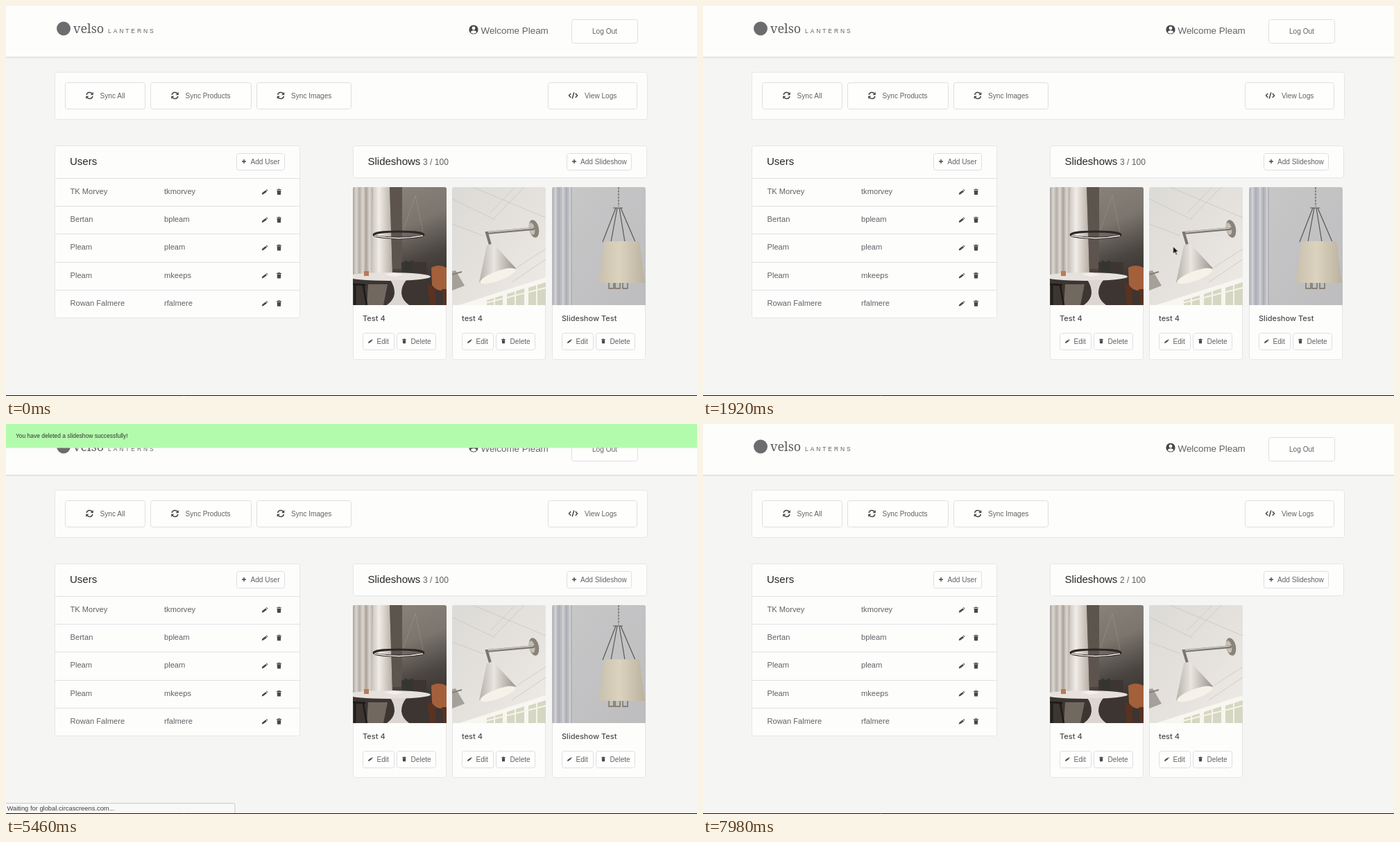
These frames come from a looping animation (996x562 px, 8000 ms). An HTML page:

```html
<!DOCTYPE html>
<html lang="en">
<head>
<meta charset="utf-8">
<title>Dashboard</title>
<style>
html, body { margin: 0; width: 100%; height: 100%; overflow: hidden; background: #f5f5f4; }
svg { display: block; width: 996px; height: 562px; font: 10.1px "Liberation Sans", Arial, sans-serif; fill: #626265; }
.panel { fill: #fdfdfc; stroke: #e6e6e9; }
.button { fill: #fefefd; stroke: #dfdfe3; }
.rule { stroke: #e0e0e5; fill: none; }
.icon { fill: #48484a; }
.row { font-size: 11.15px; }
.title { font-size: 15px; fill: #262628; }
.name { font: 500 11px Inter, sans-serif; fill: #4c4c4f; }
.cover { fill: #fdfdfc; transform-box: fill-box; transform-origin: bottom; }
.small { font-size: 9.35px; fill: #404042; }
</style>
</head>
<body>
<svg id="stage" viewBox="0 0 996 562">
  <defs>
    <filter id="shadow" x="-5%" y="-20%" width="110%" height="150%">
      <feDropShadow dx="0" dy="1" stdDeviation="1.5" flood-opacity=".13"/>
    </filter>
    <linearGradient id="wall" x2=".3" y2="1">
      <stop stop-color="#8d8780"/><stop offset=".45" stop-color="#7b756e"/><stop offset=".75" stop-color="#4b4541"/><stop offset="1" stop-color="#37312f"/>
    </linearGradient>
    <linearGradient id="curtain" x2=".3" spreadMethod="reflect">
      <stop stop-color="#a8a29b"/><stop offset=".5" stop-color="#dcd7d0"/><stop offset="1" stop-color="#b4aea7"/>
    </linearGradient>
    <linearGradient id="drape">
      <stop stop-color="#c9c3bb"/><stop offset=".35" stop-color="#f0ece6"/><stop offset="1" stop-color="#b5ada4"/>
    </linearGradient>
    <linearGradient id="ceiling" x2="1" y2="1">
      <stop stop-color="#dcdad6"/><stop offset=".6" stop-color="#e6e3df"/><stop offset="1" stop-color="#efece7"/>
    </linearGradient>
    <linearGradient id="cone">
      <stop stop-color="#b5b1aa"/><stop offset=".4" stop-color="#e9e5df"/><stop offset="1" stop-color="#98938b"/>
    </linearGradient>
    <linearGradient id="shade">
      <stop stop-color="#c8c0ad"/><stop offset=".45" stop-color="#dcd3bf"/><stop offset="1" stop-color="#bbb29f"/>
    </linearGradient>
    <linearGradient id="plaster" x2="1" y2="1">
      <stop stop-color="#c8c8c9"/><stop offset="1" stop-color="#bdbdbf"/>
    </linearGradient>
    <clipPath id="frame"><path d="M0 170V3q0-3 3-3h129q3 0 3 3v167z"/></clipPath>

    <g id="loft">
      <path fill="url(#wall)" d="M0 0h135v170H0z"/>
      <path fill="url(#curtain)" d="M0 0h32v126H0z"/>
      <path fill="url(#drape)" d="M29 0h24l4 126H27z"/>
      <path fill="#5c544d" d="M53 0h18v118H57z"/>
      <path fill="#3c3531" d="M0 130h135v40H0zM70 108h36v30H70z"/>
      <path fill="#716860" d="M22 140h28l-6 30H20z"/>
      <path fill="#35352f" d="M73 114l2-9 5 3 7-3-2 10 4 12H75z"/>
      <path fill="#a4603b" d="M113 116q10-6 22 0v32q-14 4-21-7z"/>
      <path fill="#583222" d="M107 138l12 8v24h-8zM128 147h7v23h-4z"/>
      <path stroke="#aaa69e" stroke-width=".6" d="M90 12L72 64M90 12l11 52" opacity=".6"/>
      <ellipse cx="66" cy="68.5" rx="36" ry="4.5" fill="none" stroke="#2b2726" stroke-width="3"/>
      <path d="M31 70q35 7 70 0" fill="none" stroke="#f6f1e6" stroke-width="1.5"/>
      <ellipse cx="52" cy="129" rx="60" ry="6" fill="#e6e1dd"/>
      <path fill="#dcd6d2" d="M54 134h23q-7 8-7 19 1 10 11 17H49q10-7 11-17 0-11-6-19z"/>
      <path fill="#b97b55" d="M16 121h7v7h-7z"/>
      <path fill="#f4efe9" d="M46 126l13-3 14 3-13 3z"/>
      <path fill="none" stroke="#1b1919" stroke-width="2.5" d="M0 140l18 1M3 141v29M15 142l5 28"/>
    </g>
    <g id="sconce">
      <path fill="url(#ceiling)" d="M0 0h135v170H0z"/>
      <path fill="none" stroke="#c9c6c1" stroke-width=".8" d="M0 17l62 30M0 53l45 17M30 0l105 44M91 0L55 37M104 0L60 45M135 89l-42 27M135 104l-49 33"/>
      <path fill="#f8f6f0" d="M10 170l125-40v40z"/>
      <path fill="#d5d7c2" d="M50 163l23-7v14H50zM79 154l25-8v24H79zM110 145l25-8v33h-25z"/>
      <path stroke="#f6f4e9" stroke-width="2" d="M61 158v12M91 149v21M122 141v29M48 167l87-22"/>
      <ellipse cx="118" cy="60" rx="7" ry="13" transform="rotate(-12 118 60)" fill="#89837a"/>
      <ellipse cx="115" cy="60" rx="4" ry="9" transform="rotate(-12 115 60)" fill="#c5bfb6"/>
      <path fill="none" stroke="#7b756d" stroke-width="4" stroke-linecap="round" d="M117 60l-67 6 5 17"/>
      <path fill="none" stroke="#d0cac1" stroke-width="1.4" d="M117 59l-65 6"/>
      <path fill="url(#cone)" d="M50 84l9-3 33 36q-12 19-53 20z"/>
      <ellipse cx="66" cy="128" rx="27" ry="7" transform="rotate(-20 66 128)" fill="#f6f2e9"/>
      <path fill="#a5a099" d="M0 121l5-1 13 22-18 7z"/>
      <path stroke="#85807a" stroke-width="2" d="M0 126l14-4"/>
    </g>
    <g id="pendant">
      <path fill="url(#plaster)" d="M0 0h135v170H0z"/>
      <path fill="#b9babf" d="M0 0h28v170H0z"/>
      <path stroke="#cfd0d4" stroke-width="3" d="M5 0v170M16 0v170M26 0v170"/>
      <path stroke="#a2a3a8" d="M10 0v170M21 0v170M28 0v170"/>
      <path stroke="#66625d" stroke-width="1.3" stroke-dasharray="3 1.5" d="M96 0v28"/>
      <path fill="none" stroke="#5a5650" stroke-width="1.2" d="M88 30h14M92 30L73 79M94 30l-9 49M97 30l8 49M99 30l21 49"/>
      <path fill="none" stroke="#786f5d" stroke-width="1.4" d="M82 136v10h7v-10M91 136v10h7v-10M102 136v10h7v-10"/>
      <path fill="url(#shade)" d="M76 78h50l8 60H67z"/>
    </g>

    <path id="pencil" class="icon" d="M-4 4l.6-2.6 5.2-4 2 2L-1.4 3.4zM2.5-3.3l.8-.8 2 2-.8.8z"/>
    <path id="trash" class="icon" d="M-3.6-4h2l.5-.8h2.2l.5.8h2v1.2h-7.2zM-3-2.2h6l-.4 6.4h-5.2z"/>
    <path id="plus" class="icon" d="M-.7-3h1.4v2.3H3V.7H.7V3H-.7V.7H-3V-.7h2.3z"/>
    <g id="sync">
      <path d="M-4.4-1a4.5 4.5 0 0 1 8-1.8M4.4 1a4.5 4.5 0 0 1-8 1.8" fill="none" stroke="#48484a" stroke-width="1.5"/>
      <path class="icon" d="M5.3-5v4.2H1.1zM-5.3 5V.8h4.2z"/>
    </g>
    <path id="code" d="M-3.3-3L-6 0l2.7 3M3.3-3L6 0 3.3 3M1.3-4.5l-2.6 9" fill="none" stroke="#48484a" stroke-width="1.5"/>
  </defs>

  <g id="page"></g>
  <g id="status">
    <path d="M-1 563v-16.5h328q3 0 3 3V563z" fill="#f8f8f7" stroke="#c9c9cd"/>
    <text id="link" class="small" x="1.5" y="557">global.circascreens.com/admin/dashboard</text>
    <text id="waiting" class="small" x="1.5" y="557">Waiting for global.circascreens.com...</text>
  </g>
  <path d="M0 561.5h996" stroke="#111"/>
  <g id="banner">
    <path d="M0 0h996v34.5H0z" fill="#b3fbac"/>
    <text x="14" y="20" style="font-size:8.45px;fill:#333">You have deleted a slideshow successfully!</text>
  </g>
  <g id="cursor" stroke-linejoin="round">
    <path id="resize" d="M-6 0l3.5-3.4V-1h5v-2.4L6 0 2.5 3.4V1h-5v2.4z" fill="#111" stroke="#fff" stroke-width=".7"/>
    <path id="arrow" d="M-3-6V5l2.6-2.4 1.8 4 1.8-.8-1.8-3.9H5z" fill="#111" stroke="#fff" stroke-width=".8"/>
    <path id="hand" d="M-2.4.6v-5.4c0-1.5 2-1.5 2 0v3.4l3.6.8c1.1.3 1.5 1 1.4 2.1L4 5.6h-5L-4.6 1.3c-.8-1.1.6-2 1.3-1.3z" fill="#fff" stroke="#222" stroke-width="1.1"/>
  </g>
</svg>
<script>
const LOOP = 8000, RELOAD = 6000;
const $ = id => document.getElementById(id);

const text = (x, y, label, cls = '') => `<text x="${x}" y="${y}" class="${cls}">${label}</text>`;
const box = (x, y, w, h, cls) => `<rect x="${x + .5}" y="${y + .5}" width="${w - 1}" height="${h - 1}" rx="3" class="${cls}"/>`;
const icon = (name, x, y, scale = 1) => `<use href="#${name}" transform="translate(${x} ${y}) scale(${scale})"/>`;
const button = (x, y, w, h, name, iconX, label, labelX, scale) =>
  box(x, y, w, h, 'button') + (name ? icon(name, iconX, y + h / 2 - .5, scale) : '') + text(labelX, y + h / 2 + 3, label);

const header = `
  <path d="M-5-5h1006v78H-5z" fill="#fdfdfc" filter="url(#shadow)"/>
  <circle cx="83" cy="32.5" r="10" fill="#6c6b6e"/>
  <text x="97" y="39" style="font:400 18px 'Noto Serif',serif;fill:#5c5b5e">velso</text>
  <text x="147" y="39" style="font-size:8.5px;letter-spacing:2.9px">LANTERNS</text>
  <circle cx="674" cy="34" r="6.6" class="icon"/>
  <circle cx="674" cy="32" r="2.4" fill="#fff"/><path d="M669.8 38q.6-2.8 4.2-2.8t4.2 2.8q-4.2 3.4-8.4 0z" fill="#fff"/>
  <text x="684.5" y="39.5" style="font-size:13.4px">Welcome Pleam</text>` +
  button(815, 19, 96, 35, '', 0, 'Log Out', 845);

const tools = box(70, 95, 855, 69, 'panel') +
  button(85, 110, 116, 39, 'sync', 120.5, 'Sync All', 135.5) +
  button(208, 110, 146, 39, 'sync', 243.5, 'Sync Products', 258.5) +
  button(361, 110, 137, 39, 'sync', 396, 'Sync Images', 411) +
  button(781, 110, 129, 39, 'code', 817.5, 'View Logs', 834);

const people = [['TK Morvey', 'tkmorvey'], ['Bertan', 'bpleam'], ['Pleam', 'pleam'],
  ['Pleam', 'mkeeps'], ['Rowan Falmere', 'rfalmere']];
const users = box(70, 201, 354, 249, 'panel') + text(92, 228.5, 'Users', 'title') +
  button(332, 212, 70, 25, 'plus', 343, 'Add User', 352.5) +
  people.map(([name, login], i) => {
    const y = 248.5 + i * 40.2;
    return `<path class="rule" d="M71 ${Math.floor(y) + .5}h352"/>` + text(92.5, y + 22.5, name, 'row') +
      text(228, y + 22.5, login, 'row') + icon('pencil', 372.5, y + 19.5, .95) + icon('trash', 393.5, y + 19.5, .95);
  }).join('');

const card = (x, photo, name) => `<g id="card-${photo}">` + box(x, 261, 135, 249, 'panel') +
  `<g transform="translate(${x} 261)" clip-path="url(#frame)"><use href="#${photo}"/>
   <rect id="cover-${photo}" class="cover" width="135" height="170"/></g>` +
  text(x + 14, 453.5, name, 'name') +
  button(x + 14, 471, 46, 25, 'pencil', x + 25, 'Edit', x + 34.5, .75) +
  button(x + 63, 471, 57, 25, 'trash', x + 74, 'Delete', x + 83.5, .75) + '</g>';

const count = (id, n) => `<text id="${id}" x="601" y="228.5" style="font-size:12.1px">${n} / 100</text>`;
const slideshows = box(500, 201, 424, 47, 'panel') + text(521.5, 228.5, 'Slideshows', 'title') +
  count('before', 3) + count('after', 2) +
  button(808, 212, 94, 25, 'plus', 819, 'Add Slideshow', 828) +
  card(500, 'loft', 'Test 4') + card(643, 'sconce', 'test 4') + card(787, 'pendant', 'Slideshow Test');

$('page').innerHTML = header + tools + users + slideshows;

// Steps are [ms, value, easing until the next step].
function play(id, prop, steps) {
  const frames = [[0, steps[0][1]], ...steps, [LOOP, steps.at(-1)[1]]].map(([ms, value, easing = 'linear']) =>
    ({ offset: ms / LOOP, [prop]: value, easing }));
  $(id).animate(frames, { duration: LOOP, iterations: Infinity }).startTime = 0;
}
const HOLD = 'steps(1, end)';
const show = (id, from, to) =>
  play(id, 'opacity', [[0, from ? 0 : 1, HOLD], [from, 1, HOLD], [to, to < LOOP ? 0 : 1, HOLD]]);
const move = (x, y) => `translate(${x}px, ${y}px)`;

play('page', 'transform', [[1020, move(0, 0)], [1110, move(0, -1.5)], [1290, move(0, -1.5)], [1440, move(0, 0)]]);
play('cursor', 'transform', [[1050, move(455, 216)], [1170, move(465, 213)], [1400, move(492, 223), 'ease-in-out'],
  [2450, move(874, 485)], [2820, move(877, 487)], [3500, move(879, 488), 'ease-in-out'], [4080, move(887, 488)]]);
show('resize', 1050, 1400);
show('arrow', 1400, 2450);
show('hand', 2450, 4650);

show('status', 2490, 7140);
show('link', 2490, 4410);
show('waiting', 4410, 7140);
play('banner', 'transform', [[4680, move(0, -36), 'ease-out'], [4980, move(0, 0), HOLD], [RELOAD, move(0, -36)]]);

show('before', 0, RELOAD);
show('after', RELOAD, LOOP);
show('card-pendant', 0, RELOAD);
const load = (photo, start) => play('cover-' + photo, 'transform',
  [[0, 'scaleY(0)', HOLD], [RELOAD, 'scaleY(1)', HOLD], [start, 'scaleY(1)'], [start + 260, 'scaleY(0)']]);
load('loft', 6895);
load('sconce', 6883);
play('cover-pendant', 'transform', [[0, 'scaleY(0)']]);
</script>
</body>
</html>
```
